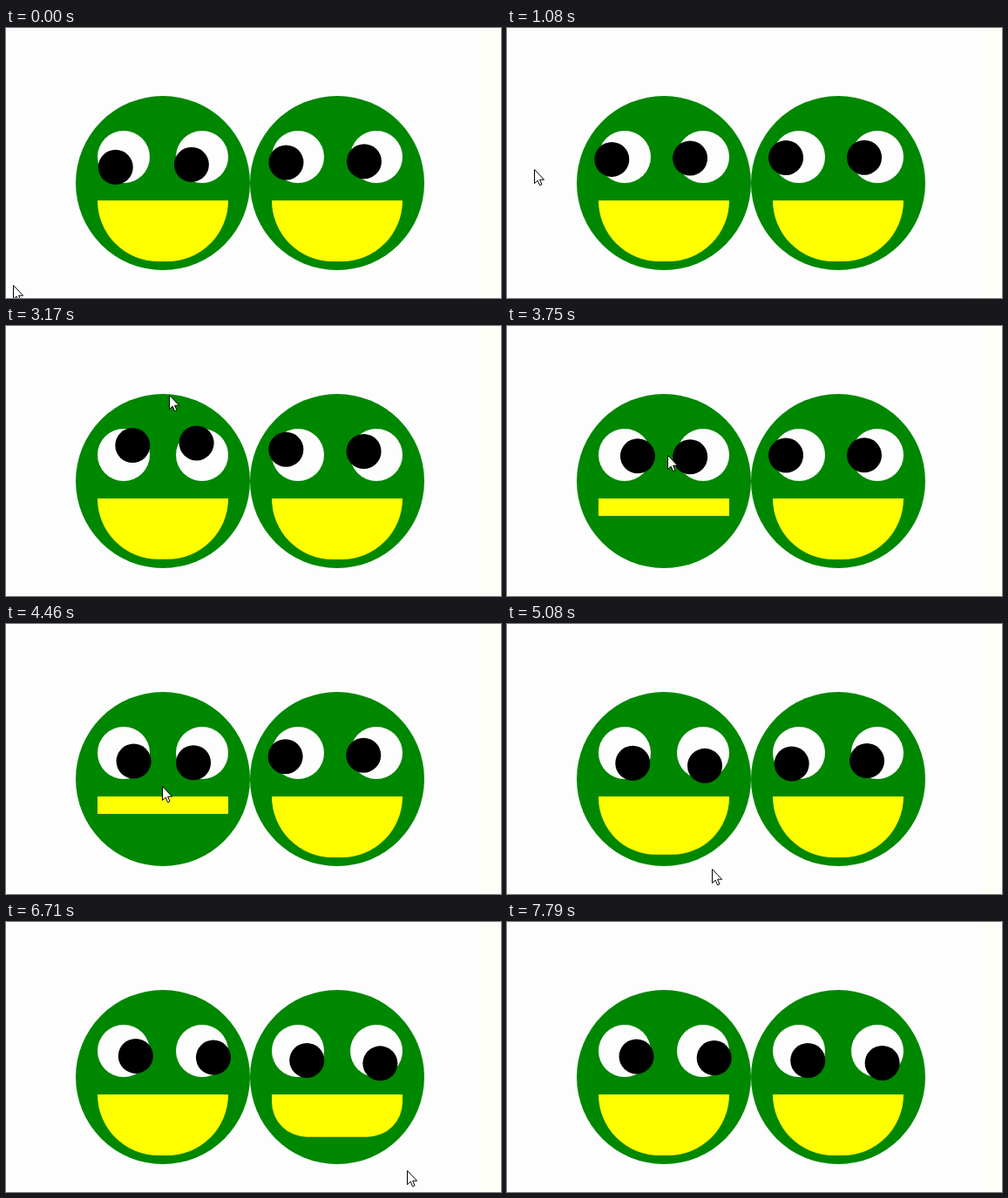
Animation, 568 px wide and 310 px high, one loop 9080 ms. Source, as an HTML page with a canvas:

```html
<!DOCTYPE html>
<html lang="en">
<head>
<meta charset="utf-8">
<title>Watching faces</title>
<style>
  html, body { margin: 0; width: 100%; height: 100%; overflow: hidden; background: #fdfdfe; }
  canvas { display: block; }
</style>
</head>
<body>
<canvas id="stage" width="568" height="310"></canvas>
<script>
const ctx = document.getElementById('stage').getContext('2d');
const LOOP = 9080;
const EASE_MS = 500;
const FACE_Y = 178, FACE_R = 100;
const GAZE = { x: 8, y: 5 }; // the eyes look slightly past the arrow tip

// Pointer stops: reached at "from", left at "until"
const stop = (x, y, from, until = from) => ({ x, y, from, until });
const STOPS = [
  stop(8, 295, 0, 420),
  stop(31, 162, 1080),
  stop(34, 125, 1420, 1630),
  stop(199, 3, 2250),
  stop(187, 79, 3170),
  stop(184, 148, 3750, 3920),
  stop(179, 186, 4460),
  stop(195, 298, 4850),
  stop(323, 231, 5540, 6130),
  stop(467, 288, 6800, 7080),
  stop(536, 294, 7440),
  stop(486, 314, 7790, LOOP)
];

// CSS "ease" timing curve, solved by bisection
function ease(x) {
  if (x <= 0) return 0;
  if (x >= 1) return 1;
  let lo = 0, hi = 1;
  for (let i = 0; i < 20; i++) {
    const s = (lo + hi) / 2;
    if (0.75 * s * (1 - s) + s ** 3 < x) lo = s; else hi = s;
  }
  return 0.3 * lo * (1 - lo) ** 2 + 3 * lo * lo * (1 - lo) + lo ** 3;
}

function slope(i, axis) {
  const a = STOPS[i], b = STOPS[i + 1];
  return (b[axis] - a[axis]) / (b.from - a.until);
}

// Speed at a stop: zero at rests and turning points
function speed(i, axis) {
  if (STOPS[i].until > STOPS[i].from) return 0;
  const p = slope(i - 1, axis), q = slope(i, axis);
  return p * q > 0 ? 2 * p * q / (p + q) : 0;
}

function glide(t, i, axis) {
  const a = STOPS[i], b = STOPS[i + 1];
  const d = b.from - a.until, u = (t - a.until) / d, v = 1 - u;
  return a[axis] * (1 + 2 * u) * v * v + b[axis] * (1 + 2 * v) * u * u
    + d * u * v * (speed(i, axis) * v - speed(i + 1, axis) * u);
}

function pointerAt(t) {
  const i = STOPS.findLastIndex(s => s.from <= t);
  if (t <= STOPS[i].until) return STOPS[i];
  return { x: glide(t, i, 'x'), y: glide(t, i, 'y') };
}

// A face closes its mouth while the pointer is over it
function makeFace(x) {
  const hovered = [];
  for (let t = 0; t < LOOP; t += 5) {
    const p = pointerAt(t);
    if (Math.hypot(p.x - x, p.y - FACE_Y) < FACE_R) hovered.push(t);
  }
  return { x, enter: hovered[0], leave: hovered.at(-1) };
}

const FACES = [180, 380].map(makeFace);

function disc(x, y, r, color) {
  ctx.fillStyle = color;
  ctx.beginPath();
  ctx.arc(x, y, r, 0, Math.PI * 2);
  ctx.fill();
}

function drawEye(x, y, pointer) {
  disc(x, y, 30, '#fdfdfe');
  const angle = Math.atan2(pointer.y + GAZE.y - y, pointer.x + GAZE.x - x);
  disc(x + 15 * Math.cos(angle), y + 15 * Math.sin(angle), 20, '#000');
}

function drawMouth(x, y, closed) {
  const r = 70 * (1 - closed);
  ctx.fillStyle = '#ff0';
  ctx.beginPath();
  ctx.roundRect(x, y, 150, 70 - 50 * closed, [0, 0, r, r]);
  ctx.fill();
}

function drawFace(face, t, pointer) {
  const closed = ease((t - face.enter) / EASE_MS) - ease((t - face.leave) / EASE_MS);
  disc(face.x, FACE_Y, FACE_R, '#008700');
  drawMouth(face.x - 75, 198, closed);
  drawEye(face.x - 45, 148, pointer);
  drawEye(face.x + 45, 148, pointer);
}

function drawArrow({ x, y }) {
  const shape = new Path2D('M.5 .5V16.5L4.2 13.1L6.6 18.7L9 17.7L6.6 12.2H11.6Z');
  ctx.save();
  ctx.translate(Math.round(x), Math.round(y));
  ctx.fillStyle = '#fff';
  ctx.strokeStyle = '#000';
  ctx.fill(shape);
  ctx.stroke(shape);
  ctx.restore();
}

function draw(t) {
  const pointer = pointerAt(t);
  ctx.fillStyle = '#fdfdfe';
  ctx.fillRect(0, 0, 568, 310);
  ctx.fillStyle = '#fefef8';
  ctx.fillRect(545, 0, 23, 310);
  FACES.forEach(face => drawFace(face, t, pointer));
  drawArrow(pointer);
}

const start = performance.now();
function tick() {
  draw(Math.max(0, performance.now() - start) % LOOP);
  requestAnimationFrame(tick);
}
tick();
</script>
</body>
</html>
```
